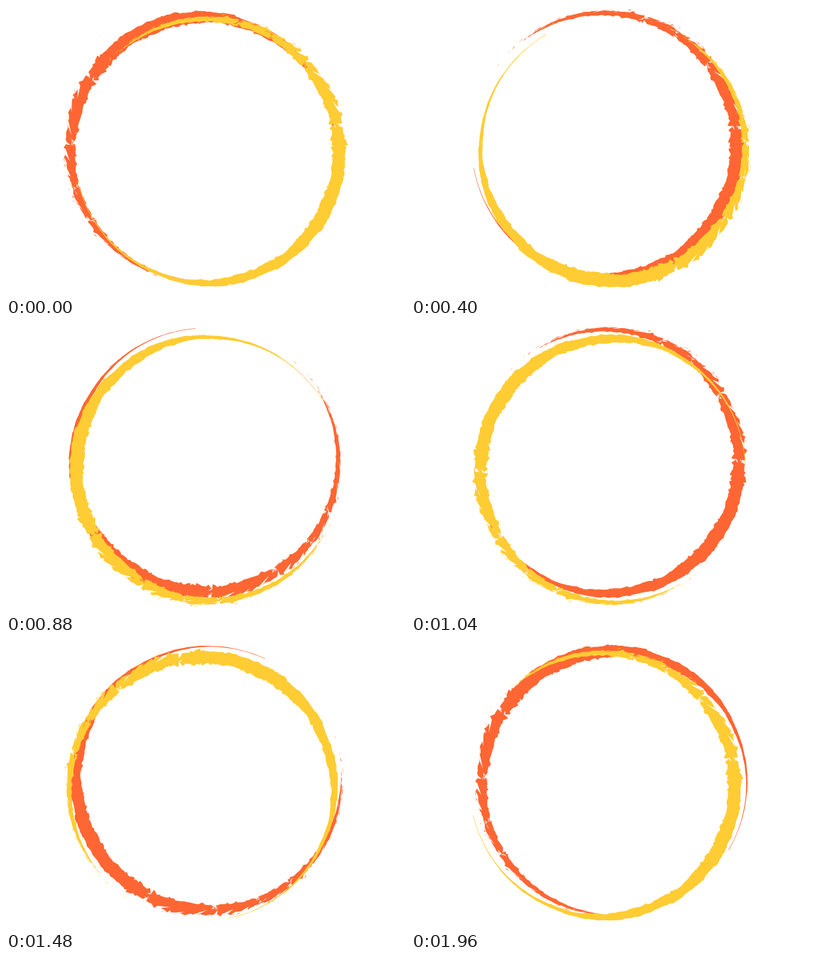
Recreate the animation shown at these times as an HTML page with a canvas. Size 550 by 400 pixels, loop 2 s.

```html
<!DOCTYPE html>
<html lang="en">
<head>
<meta charset="utf-8">
<title>Brush rings</title>
<style>
html, body { margin: 0; width: 100%; height: 100%; overflow: hidden; background: #fff; }
canvas { display: block; }
</style>
</head>
<body>
<canvas id="stage" width="550" height="400"></canvas>
<script>
const ctx = document.getElementById('stage').getContext('2d');
const FRAME = 40, FRAMES = 50;
const HEAD = -54, TAIL = 246;        // stroke ends, in clockwise degrees
const NOTCHES = [0, 15, 34, 65];     // deep gaps in the bristles
const rad = deg => deg * Math.PI / 180;

let seed = 11;
function rnd(min = 0, max = 1) {
  seed = (seed * 16807) % 2147483647;
  return min + (max - min) * seed / 2147483647;
}

// The stroke swells in the middle and tapers more sharply towards the tail
function width(a) {
  const x = (a - HEAD) / (TAIL - HEAD);
  return .6 + 17.5 * Math.max(0, Math.sin(Math.PI * x)) ** (x < .5 ? 1 : 2.1);
}
const middle = a => 182.5 - 4.8 * Math.cos(rad(a - 95));

// 1 in the dry, ragged first part, falling to .35 in the smooth tail
const dryness = a => a < 70 ? 1 : Math.max(.35, 1 - (a - 70) / 120);

function polar(a, r) {
  return [r * Math.sin(rad(a)), -r * Math.cos(rad(a))];
}

function addShape(path, points) {
  points.forEach(([a, r], i) => path[i ? 'lineTo' : 'moveTo'](...polar(a, r)));
  path.closePath();
}

// side is 1 for the outer edge, -1 for the inner edge
function edge(side) {
  const points = [], notches = [...NOTCHES];
  let drift = 0, nextCut = -20;
  for (let a = HEAD; a < TAIL; a += rnd(.6, 1.5)) {
    const w = width(a), rough = Math.min(1, w / 14);
    drift = drift * .8 + rnd(-.9, .9);
    const spike = rnd() ** 4 * 4 * dryness(a);
    const r = middle(a) + side * (w / 2 + (drift + spike - .8) * rough);
    points.push([a + rnd(-.6, .6) * rough, r]);

    const notch = a >= notches[0];
    if (notch) notches.shift();
    if (notch || (side > 0 && a > nextCut && a < 75)) {
      const depth = w * (notch ? .42 : rnd(.2, .6));
      const slant = notch ? 0 : rnd(1, 5), open = rnd(.9, 2);
      points.push([a - slant, r - side * depth], [a + open, r - side * rnd(0, 2)]);
      a += open;
      nextCut = a + rnd(4, 9);
    }
  }
  return points;
}

function sliver(path, a, r, len, h) {
  addShape(path, [[a - len, r - h], [a, r - h * .6], [a + len, r + h], [a + len * .2, r + h * .8]]);
}

function brushRing() {
  const path = new Path2D();
  addShape(path, [...edge(1), ...edge(-1).reverse()]);
  // Chips inside the stroke, flecks before it and along its outer edge
  for (const a of NOTCHES) {
    for (let i = 0; i < 3; i++) sliver(path, a + rnd(-2, 3), middle(a) + rnd(-4, 4), rnd(.5, 1.4), rnd(.6, 1.8));
  }
  for (let i = 0; i < 14; i++) sliver(path, rnd(-70, -25), rnd(186, 190), rnd(.4, 1.6), rnd(.3, .8));
  for (let i = 0; i < 10; i++) sliver(path, rnd(-15, 60), rnd(189, 192), rnd(.3, 1), rnd(.4, 1));
  return path;
}

const ring = brushRing();

function drawRing(color, x, y, degrees) {
  ctx.setTransform(1, 0, 0, 1, x, y);
  ctx.rotate(rad(degrees));
  ctx.fillStyle = color;
  ctx.fill(ring, 'evenodd');
}

const start = performance.now();
function draw() {
  const step = Math.floor((performance.now() - start) / FRAME) % FRAMES;
  const u = step / (FRAMES - 1);
  ctx.setTransform(1, 0, 0, 1, 0, 0);
  ctx.fillStyle = '#fff';
  ctx.fillRect(0, 0, 550, 400);
  drawRing('#ff6633', 269 + 9 * u, 194, 236 - 1080 * u);
  drawRing('#ffcc33', 281 - 13 * u, 202, 12 + 360 * u);
  requestAnimationFrame(draw);
}
draw();
</script>
</body>
</html>
```
